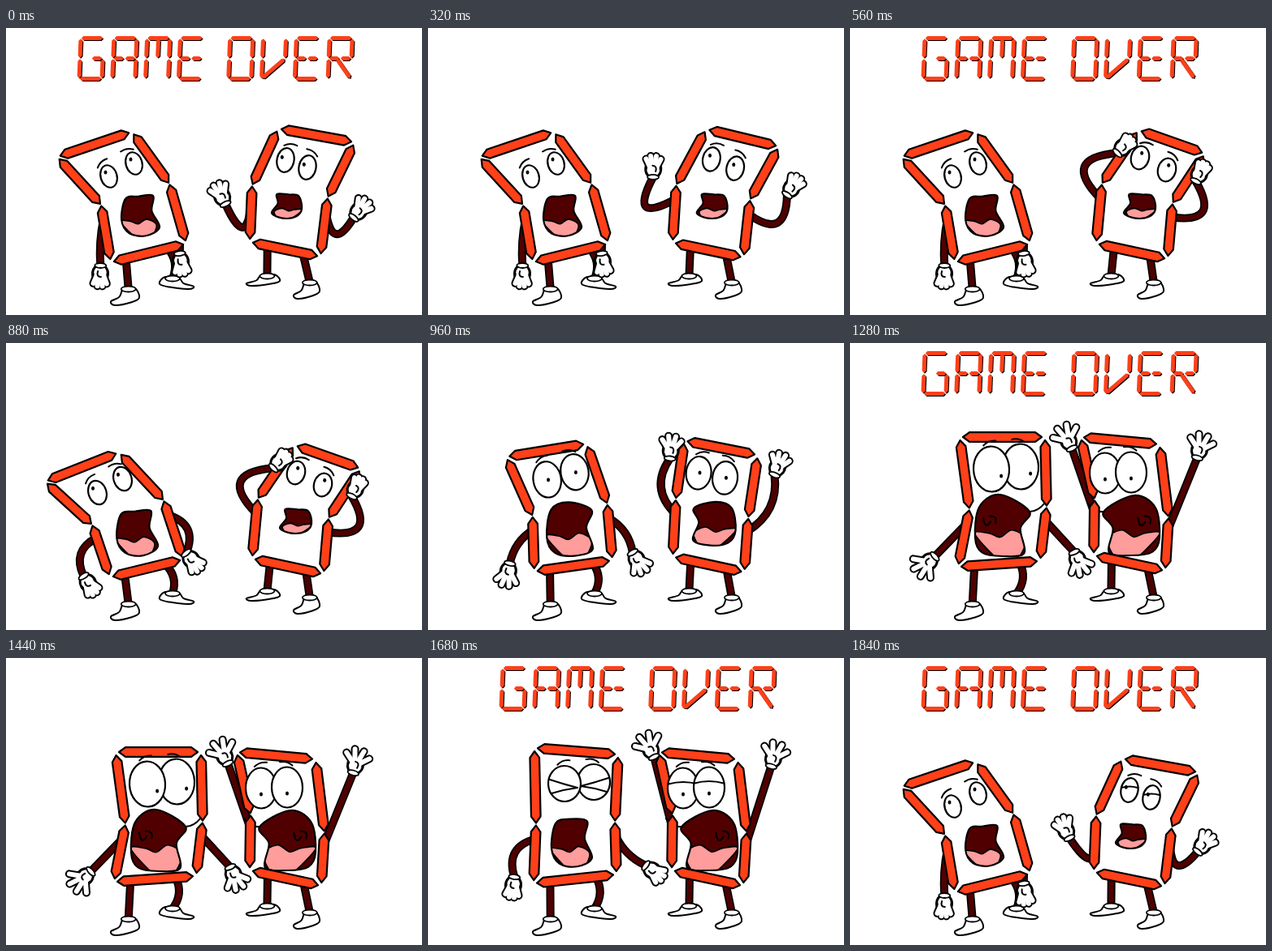
Write an HTML page with a canvas that moves like this. It is 512x354 px and loops after 1920 ms.

```html
<!DOCTYPE html>
<html>
<head>
<meta charset="utf-8">
<style>
html, body { margin: 0; height: 100%; overflow: hidden; background: #fff; }
canvas { display: block; width: 512px; height: 354px; }
</style>
</head>
<body>
<canvas id="stage" width="512" height="354"></canvas>
<script>
const ctx = document.getElementById('stage').getContext('2d');
const RED = '#ff4019', DARK = '#500000', PINK = '#ff9c9c', STEP = 80, LOOP = 1920;

function mix(a, b, u) {
  if (typeof a === 'number') return a + (b - a) * u;
  if (Array.isArray(a)) return a.map((v, i) => mix(v, b[i], u));
  return Object.fromEntries(Object.keys(a).map(k => [k, mix(a[k], b[k], u)]));
}

// body: TL, TR, ML, MR, BL, BR
// eyes: centre, half spacing, radii, gaze; mouth: centre, half size, roundness
// arms: hand centre, hand angle, finger spread, elbow bend
const pose = (body, eyes, mouth, ...arms) => ({ body, eyes, mouth, arms, lid: 0 });

// Same pose with both hands moved inwards and down
const moveHands = (p, dx, dy) => ({
  ...p, arms: p.arms.map(([x, y, ...rest], i) => [x + (i ? -dx : dx), y + dy, ...rest])
});

const slump = pose([[63,159],[155,128],[117,218],[201,192],[129,289],[222,266]],
  [142,175,15.5,-8,10,14,-.4,-.35], [165,232,24,25,0],
  [116,303,1.6,.3,2], [215,288,1.45,.3,-3]);
const lean = pose([[48,171],[139,135],[106,224],[194,194],[128,289],[218,267]],
  [128,176,15.5,-8.5,11,15,-.5,-.35], [161,235,26,28,0],
  [101,296,1,.3,12], [228,267,.9,.4,-14]);
const scream = pose([[135,116],[240,116],[147,205],[242,202],[133,276],[234,269]],
  [192,154,18,-1.5,22,28,.55,.3], [188,225,34,38,1],
  [97,270,2.4,1,0], [280,267,1.15,.8,0]);
const squint = pose([[131,111],[234,119],[133,205],[230,202],[130,278],[232,267]],
  [186,154,18,-1,20,22,.5,.2], [177,228,26,30,.2],
  [105,280,1.7,.3,14], [276,262,.65,.4,5]);

const plead = pose([[335,124],[429,141],[303,194],[396,209],[300,264],[387,282]],
  [357.5,167.5,13.5,4.5,10.5,15,-.4,-.25], [346,220,-19,15,0],
  [266,208,-2,.5,-32], [434,226,-.9,.5,24]);
const clutch = pose([[355,126],[437,155],[310,192],[397,216],[303,266],[391,285]],
  [373.5,167.5,16.5,7.5,11,14.5,.2,-.4], [357,220,-20,15,0],
  [336,147,-.8,.2,-32], [430,180,-1.1,.2,28]);
const panic = pose([[284,116],[381,125],[301,193],[392,215],[300,262],[388,281]],
  [330,160,16,-.5,19,25,0,.3], [346,225,-35,37,1],
  [269,121,-2,1,0], [430,132,-1.3,.9,0]);

const wave = (p, from, to) => Array.from({ length: to - from + 1 },
  (_, i) => [from + i, (from + i) % 2 ? moveHands(p, 5, -8) : p]);

// shoes: toe x, top y, width towards the heel, height; legs: hip along the bottom bar, knee bend
const left = {
  keys: [[0, slump], [10, slump], [11, lean], ...wave(scream, 14, 19),
    [21, { ...squint, lid: 1 }], [23, slump]],
  legs: [[.2, 0], [.75, -6]], shoes: [[129,319,35,23], [231,306,-42,16]], frontEye: 0
};
const right = {
  keys: [[0, plead], [3, plead], [5, moveHands(mix(plead, clutch, .5), -20, -15)], [7, clutch],
    [11, clutch], ...wave(panic, 14, 20), [21, { ...moveHands(panic, 5, -8), lid: .5 }],
    [23, { ...moveHands(plead, 0, 5), lid: .4 }]],
  legs: [[.25, 0], [.75, 0]], shoes: [[296,303,41,15], [354,311,32,23]], frontEye: 1
};

// Unit outlines, scaled and mirrored where they are drawn
const GAPE = [[-.95,.2],[-.75,-.85],[-.1,-.97],[.67,-1],[.6,-.25],[1,.55],[.3,.97],[-.55,.85]];
const WAIL = [[-1,.4],[-.85,-.6],[-.1,-1],[.97,-.45],[.64,.1],[.78,.9],[0,1],[-.75,.88]];
const TONGUE = [[-1,.3],[-.5,.25],[-.1,.38],[.35,.15],[.85,.5],[.2,1.3]];
const SHOE = [[.45,.1],[.85,.08],[1,.6],[.7,.85],[.15,1],[0,.8],[.3,.55]];
const place = (unit, x, y, w, h) => unit.map(([u, v]) => [x + u * w, y + v * h]);

// Moves start fast and settle into each key
function poseAt(keys, step) {
  const next = keys.findIndex(k => k[0] >= step);
  if (next < 1) return keys[0][1];
  const [s0, a] = keys[next - 1], [s1, b] = keys[next];
  return mix(a, b, 1 - (1 - (step - s0) / (s1 - s0)) ** 2);
}

function paint(fill, width = 2) {
  if (fill) { ctx.fillStyle = fill; ctx.fill(); }
  if (width) { ctx.strokeStyle = '#000'; ctx.lineWidth = width; ctx.stroke(); }
}

function polygon(points) {
  ctx.beginPath();
  points.forEach(p => ctx.lineTo(...p));
  ctx.closePath();
}

// Closed smooth curve through the points
function blob(points) {
  const n = points.length, at = i => points[(i + n) % n];
  ctx.beginPath();
  ctx.moveTo(...points[0]);
  for (let i = 0; i < n; i++) {
    const [p, a, b, q] = [at(i - 1), at(i), at(i + 1), at(i + 2)];
    ctx.bezierCurveTo(a[0] + (b[0] - p[0]) / 6, a[1] + (b[1] - p[1]) / 6,
      b[0] - (q[0] - a[0]) / 6, b[1] - (q[1] - a[1]) / 6, ...b);
  }
}

function oval(x, y, rx, ry, tilt = 0) {
  ctx.beginPath();
  ctx.ellipse(x, y, rx, ry, tilt, 0, 7);
}

function curve(x1, y1, cx, cy, x2, y2) {
  ctx.beginPath();
  ctx.moveTo(x1, y1);
  ctx.quadraticCurveTo(cx, cy, x2, y2);
  paint(null, 2);
}

// Six-sided display segment between two corners
function segment([x1, y1], [x2, y2], half, tip, gap, endGap = gap) {
  const len = Math.hypot(x2 - x1, y2 - y1), ux = (x2 - x1) / len, uy = (y2 - y1) / len;
  const at = (d, o) => [x1 + ux * d - uy * o, y1 + uy * d + ux * o];
  const end = len - endGap, a = gap + tip, b = end - tip;
  polygon([at(gap, 0), at(a, half), at(b, half), at(end, 0), at(b, -half), at(a, -half)]);
}

// Limb whose middle is pushed sideways by bend
function limb([x1, y1], [x2, y2], bend) {
  const k = 2 * bend / Math.hypot(x2 - x1, y2 - y1);
  curve(x1, y1, (x1 + x2) / 2 - (y2 - y1) * k, (y1 + y2) / 2 + (x2 - x1) * k, x2, y2);
  paint(null, 10);
  ctx.strokeStyle = DARK;
  ctx.lineWidth = 6.5;
  ctx.stroke();
}

function hand([x, y, angle, spread]) {
  ctx.save();
  ctx.translate(x, y);
  ctx.rotate(angle);
  oval(0, 0, 11, 9.5);
  paint('#fff', 3);
  for (const [color, width] of [['#000', 10], ['#fff', 6]]) {
    for (let k = -1.5; k < 2; k++) {
      const bend = k * (.3 + .32 * spread), reach = 14 + 7 * spread - Math.abs(k);
      ctx.beginPath();
      ctx.moveTo(3, k * 3);
      ctx.lineTo(reach * Math.cos(bend), reach * Math.sin(bend));
      ctx.strokeStyle = color;
      ctx.lineWidth = width;
      ctx.stroke();
    }
  }
  oval(0, 0, 8.5, 7.5);
  paint('#fff', 0);
  curve(-3, 3, 4, 5, 4, -1);
  oval(-10, 0, 3, 7);
  paint('#fff', 1.8);
  ctx.restore();
}

function eye(x, y, rx, ry, gazeX, gazeY, tilt, side, lid) {
  oval(x, y, rx, ry, tilt * .6);
  paint('#fff', 2.2);
  if (lid > .8) {
    const inner = x + side * rx * .8;
    curve(x - side * rx * .9, y - 5, x, y + 1, inner, y + 5);
    curve(x - side * rx * .8, y + 12, x, y + 7, inner, y + 5);
  } else {
    if (lid > .3) curve(x - rx * .95, y - ry * .2, x, y - ry * .4, x + rx * .95, y - ry * .2);
    oval(x + gazeX * rx, y + gazeY * ry, 2, 2.5);
    paint('#000', 0);
  }
}

// Worried brow above an eye, lower on the outside
function brow(x, y, ry, tilt, side) {
  const rise = ry + 5;
  ctx.save();
  ctx.translate(x + Math.sin(tilt) * rise, y - Math.cos(tilt) * rise);
  ctx.rotate(tilt - side * .3);
  curve(-8, 1, 0, -3, 8, 1);
  ctx.restore();
}

function face({ eyes: [x, y, dx, dy, rx, ry, gazeX, gazeY], lid }, front) {
  const tilt = Math.atan2(dy, dx);
  for (const i of [1 - front, front]) {
    const side = i ? -1 : 1, ex = x - side * dx, ey = y - side * dy;
    eye(ex, ey, rx, ry, gazeX, gazeY, tilt, side, lid);
    brow(ex, ey, ry, tilt, side);
  }
}

function mouth([x, y, w, h, round]) {
  const lips = place(mix(GAPE, WAIL, round), x, y, w, h);
  blob(lips);
  paint(DARK, 0);
  ctx.save();
  ctx.clip();
  blob(place(TONGUE, x, y, w, h));
  paint(PINK, 1.8);
  if (round > .6) {
    const ux = x - .47 * w, uy = y - .2 * h;
    curve(ux - 8, uy - 2, ux - 6, uy + 14, ux + 1, uy + 3);
    curve(ux, uy - 4, ux + 10, uy - 4, ux + 7, uy + 5);
  }
  ctx.restore();
  blob(lips);
  paint(null, 2.2);
  if (round > .6) {
    const [cx, cy] = lips[3];
    curve(cx, cy, cx + w * .3, cy, cx + w * .55, cy - h * .28);
  }
}

function leg(hip, [x, y, w, h], bend) {
  const ankle = [x + w * .62, y + 3];
  limb(hip, ankle, bend);
  blob(place(SHOE, x, y, w, h));
  paint('#fff');
  oval(...ankle, 9, 3.5);
  paint('#fff', 1.8);
}

function character(who, step) {
  const now = poseAt(who.keys, step), [tl, tr, ml, mr, bl, br] = now.body;
  who.legs.forEach(([hip, bend], i) => leg(mix(bl, br, hip), who.shoes[i], bend));
  now.arms.forEach(([x, y, angle, , bend], i) => {
    const shoulder = i ? mix(mr, br, .25) : mix(ml, bl, .25);
    limb(shoulder, [x - 10 * Math.cos(angle), y - 10 * Math.sin(angle)], bend);
  });
  polygon([tl, tr, mr, br, bl, ml]);
  paint('#fff', 0);
  mouth(now.mouth);
  [[tl, tr, 4], [bl, br, 4], [tl, ml, 1.5], [tr, mr, 1.5], [bl, ml, 1.5], [br, mr, 1.5]]
    .forEach(([a, b, endGap]) => {
      segment(a, b, 5.8, 8, 4, endGap);
      paint(RED, 2.2);
    });
  face(now, who.frontEye);
  now.arms.forEach(hand);
}

// Segment ends on a grid one unit wide and two units high
const strokes = {
  a: [0,0,1,0], b: [1,0,1,1], c: [1,1,1,2], d: [0,2,1,2], e: [0,1,0,2], f: [0,0,0,1],
  g: [0,1,.5,1], h: [.5,1,1,1], i: [.5,0,.5,1], q: [.35,1,1,2], z: [1,1,0,2]
};
const title = 'afedch afbecgh afbeci afedgh / afbecd febz afedgh afbeghq'.split(' ');

function gameOver() {
  let x = 90;
  for (const letter of title) {
    if (letter === '/') { x += 20.5; continue; }
    for (const s of letter) {
      const [x1, y1, x2, y2] = strokes[s];
      const at = (u, v, o) => [x + u * 28 + 2 - v + o, 12.5 + v * 25 + o];
      for (const [color, o] of [['#000', 1], [RED, 0]]) {
        segment(at(x1, y1, o), at(x2, y2, o), 2.5, 2.5, .8);
        paint(color, 0);
      }
    }
    x += 40.8;
  }
}

function draw(now) {
  const step = Math.floor(now % LOOP / STEP);
  ctx.fillStyle = '#fff';
  ctx.fillRect(0, 0, 512, 354);
  ctx.lineCap = ctx.lineJoin = 'round';
  if (step % 7 < 4) gameOver();
  character(left, step);
  character(right, step);
}

const start = performance.now();
function frame() {
  draw(performance.now() - start);
  requestAnimationFrame(frame);
}
frame();
</script>
</body>
</html>
```
